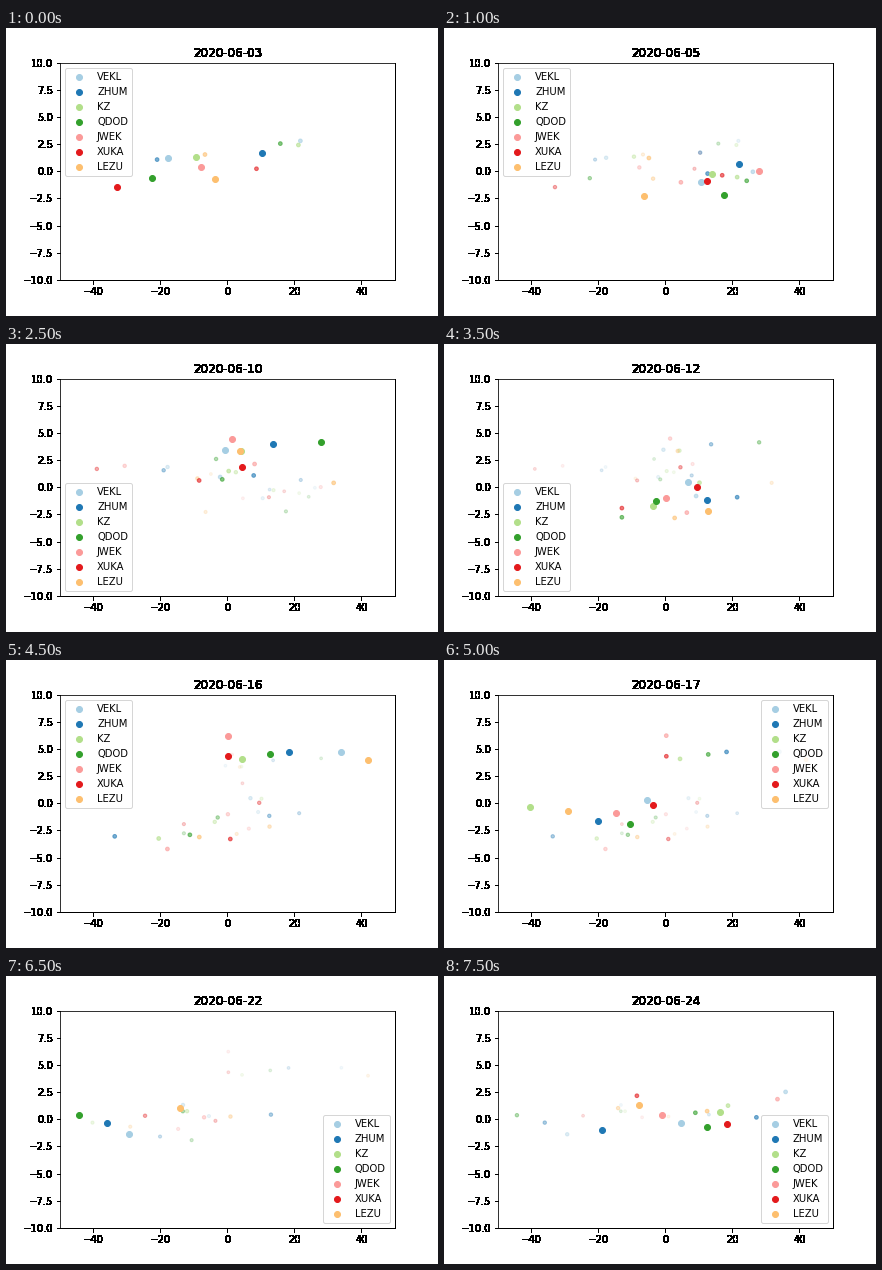
A matplotlib script that plays this animation: 432x288 px, repeating every 8 s.

```python
import numpy as np
import matplotlib.pyplot as plt
from matplotlib.animation import FuncAnimation
from matplotlib.colors import to_rgba

FRAMES = 16
TRAIL = 4
SPREAD = (15, 0.9)
SERIES = {"VEKL": "#a6cee3", "ZHUM": "#1f78b4", "KZ": "#b2df8a",
          "QDOD": "#33a02c", "JWEK": "#fb9a99", "XUKA": "#e31a1c",
          "LEZU": "#fdbf6f"}
LEGEND_STARTS = {0: "upper left", 3: "upper right", 5: "lower left",
                 8: "upper left", 10: "upper right", 11: "lower right"}

# Centre of the whole group on each day; the first lies before the opening.
# One day is far outside the axes.
CENTRES = [(6, 1.2), (-9, 0.1), (8, -0.4), (16, -0.9), (-12, 1.3), (14, 1),
           (18, 3.2), (14, -1.2), (-6, -0.7), (-25, -3.4), (15, 4.6),
           (-17, -0.3), (-14, 0.1), (120, 1), (-35, -0.4), (12, 1.6), (8, 0.3)]

rng = np.random.default_rng(6)
scatter = rng.normal(size=(len(CENTRES), len(SERIES), 2)).clip(-1.8, 1.8)
places = np.array(CENTRES)[:, None] + scatter * SPREAD

plt.rcParams.update({"font.family": "DejaVu Sans", "font.size": 10})
fig = plt.figure(figsize=(6, 4), dpi=72, facecolor="white")
ax = fig.add_subplot()
fig.subplots_adjust(left=0.125, right=0.9, bottom=0.125, top=0.88)
ax.set(xlim=(-50, 50), ylim=(-10, 10))


def solid(img, dpi):
    """Make every touched pixel fully opaque, for hard-edged text and lines."""
    out = img.copy()
    out[..., :3] = 0
    out[..., 3] = img[..., 3] > 0
    return out, 0, 0


title = ax.set_title(" ")
for artist in (title, ax.xaxis, ax.yaxis,
               ax.spines["right"], ax.spines["bottom"]):
    artist.set_agg_filter(solid)

heads = [ax.scatter([], [], s=36, color=color, label=name, zorder=3)
         for name, color in SERIES.items()]
trail = ax.scatter([], [], zorder=2)
legend = ax.legend(loc="upper left")


def update(k):
    # Weekdays only: skip two days at each weekend.
    day = 3 + k + 2 * ((k + 2) // 5)
    title.set_text(f"2020-06-{day:02d}")
    legend.set_loc(LEGEND_STARTS[max(s for s in LEGEND_STARTS if s <= k)])

    now = k + 1
    for head, place in zip(heads, places[now]):
        head.set_offsets(place)

    # Older dots shrink and fade.
    points, sizes, rgba = [], [], []
    for age in range(min(now, TRAIL), 0, -1):
        points.extend(places[now - age])
        sizes += [16 - 2 * age] * len(SERIES)
        rgba += [to_rgba(c, 0.6 ** age) for c in SERIES.values()]
    trail.set_offsets(points)
    trail.set_sizes(sizes)
    trail.set_facecolor(rgba)
    trail.set_edgecolor(rgba)
    return [title, legend, trail, *heads]


anim = FuncAnimation(fig, update, frames=FRAMES, interval=500,
                     repeat=True, repeat_delay=0)
plt.show()
```
